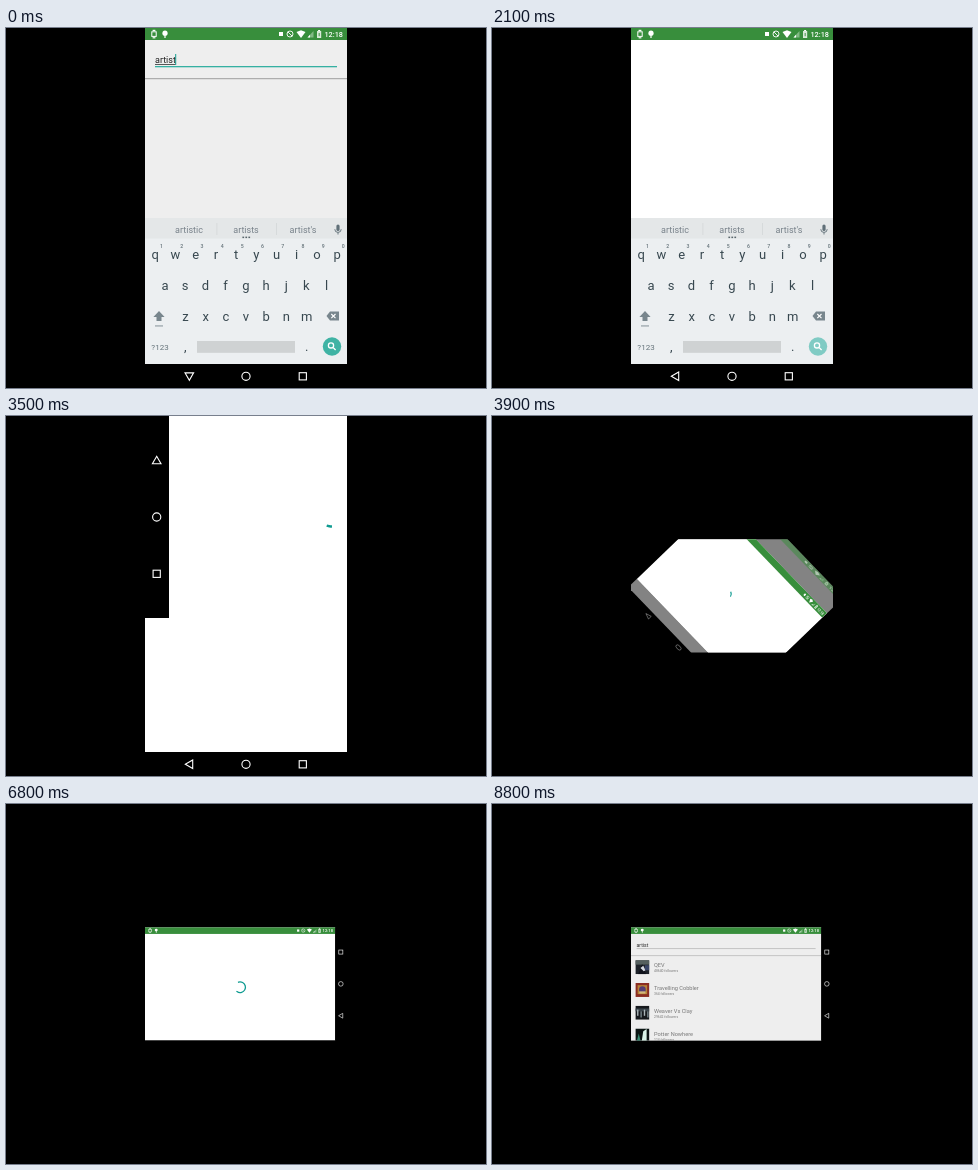
An HTML page with a canvas for the animation above (10 s loop, 480 by 360 pixels).

```html
<!DOCTYPE html>
<html lang="en">
<head>
<meta charset="utf-8">
<title>Search and rotate</title>
<style>
html, body { margin: 0; width: 100%; height: 100%; overflow: hidden; background: #000; }
canvas { display: block; width: 480px; height: 360px; }
</style>
</head>
<body>
<canvas id="stage" width="480" height="360"></canvas>
<script>
const g = document.getElementById('stage').getContext('2d');
const LOOP = 10000, STEP = 100;
const W = 202, H = 360, K = W / H;
const LEFT = 139, TOP = 123.2;
const GREEN = '#388e3c', TEAL = '#0f9b91', PAPER = '#eeeeee', INK = '#37474f';
const ARTISTS = [
  ['QEV', '48640 followers'],
  ['Travelling Cobbler', '364 followers'],
  ['Weaver Vs Clay', '29642 followers'],
  ['Potter Nowhere', '114 followers']
];

const clamp = v => Math.max(0, Math.min(1, v));
const mix = (a, b, p) => a + (b - a) * p;

function rect(x, y, w, h, color) {
  g.fillStyle = color;
  g.fillRect(x, y, w, h);
}

function disc(x, y, r, color) {
  g.fillStyle = color;
  g.beginPath();
  g.arc(x, y, r, 0, Math.PI * 2);
  g.fill();
}

function path(points, close) {
  g.beginPath();
  points.forEach(([x, y]) => g.lineTo(x, y));
  if (close) g.closePath();
}

function shape(points, color) {
  path(points, true);
  g.fillStyle = color;
  g.fill();
}

function outline(points, color, width, close) {
  path(points, close);
  g.strokeStyle = color;
  g.lineWidth = width;
  g.stroke();
}

function label(text, x, y, size, color, align = 'left', weight = 400) {
  g.font = `${weight} ${size}px Roboto, sans-serif`;
  g.textAlign = align;
  g.fillStyle = color;
  g.fillText(text, x, y);
}

function scoped(draw) {
  g.save();
  draw();
  g.restore();
}

function clipBox(x, y, w, h) {
  g.beginPath();
  g.rect(x, y, w, h);
  g.clip();
}

function statusBar(width) {
  rect(0, 0, width, 12, GREEN);
  g.strokeStyle = '#fff';
  g.lineWidth = 1;
  g.strokeRect(6.8, 3.8, 4.4, 4.6);
  rect(7.6, 1.8, 2.8, 1.2, '#fff');
  rect(7.6, 9.2, 2.8, 1.2, '#fff');
  disc(20, 5.2, 2.6, '#fff');
  rect(19.4, 7, 1.2, 3, '#fff');

  const r = width;
  rect(r - 68, 4, 4, 4, '#fff');
  g.lineWidth = 0.9;
  g.beginPath();
  g.arc(r - 57, 6, 3, 0, Math.PI * 2);
  g.moveTo(r - 59.1, 3.9);
  g.lineTo(r - 54.9, 8.1);
  g.stroke();
  shape([[r - 50.5, 4], [r - 46, 2.2], [r - 41.5, 4], [r - 46, 10]], '#fff');
  shape([[r - 39.5, 9.5], [r - 33.5, 9.5], [r - 33.5, 3]], '#82b985');
  shape([[r - 39.5, 9.5], [r - 37, 9.5], [r - 37, 6.8]], '#fff');
  rect(r - 30, 3, 4.2, 7, '#d9ead9');
  rect(r - 28.9, 2, 2, 1, '#fff');
  rect(r - 28.3, 5, 0.9, 3.2, GREEN);
  label('12:18', r - 4, 8.8, 7.3, '#fff', 'right', 500);
}

function backIcon(x, y, down) {
  scoped(() => {
    g.translate(x, y);
    if (down) g.rotate(-Math.PI / 2);
    outline([[-4, 0], [3.4, -4.3], [3.4, 4.3]], '#fff', 1.1, true);
  });
}

function homeIcon(x, y) {
  g.strokeStyle = '#fff';
  g.lineWidth = 1.1;
  g.beginPath();
  g.arc(x, y, 4.1, 0, Math.PI * 2);
  g.stroke();
}

function recentsIcon(x, y) {
  g.strokeStyle = '#fff';
  g.lineWidth = 1.1;
  g.strokeRect(x - 3.6, y - 3.6, 7.2, 7.2);
}

function bottomNav(down) {
  rect(0, 336, W, 24, '#000');
  backIcon(44.3, 348.3, down);
  homeIcon(101, 348.3);
  recentsIcon(157.8, 348.3);
}

function sideNav() {
  rect(339, 0, 21, W, '#000');
  recentsIcon(349, 44.3);
  homeIcon(349, 101);
  backIcon(349, 157.8, false);
}

// Solves a one-axis cubic for its parameter; the eased value is smoothstep.
function trimEase(x, x0, x1, x2, x3) {
  let lo = 0, hi = 1;
  for (let i = 0; i < 24; i++) {
    const s = (lo + hi) / 2, q = 1 - s;
    const at = q * q * q * x0 + 3 * s * q * q * x1 + 3 * s * s * q * x2 + s * s * s * x3;
    if (at < x) lo = s; else hi = s;
  }
  return lo * lo * (3 - 2 * lo);
}

function spinner(x, y, age, turn = 0) {
  if (age < 0) return;
  const phase = (age / 1333) % 1;
  const tail = phase < 0.5 ? 0 : 0.75 * trimEase(phase, 0.5, 0.7, 0.6, 1);
  const head = phase > 0.5 ? 0.75 : 0.75 * trimEase(phase, 0, 0.2, 0.1, 0.5);
  const base = -0.25 + phase * 0.25 + 2 * age / 6665 + turn / 360;
  g.strokeStyle = TEAL;
  g.lineWidth = 2.3;
  g.lineCap = 'square';
  g.beginPath();
  g.arc(x, y, 9.5, (base + tail) * Math.PI * 2, (base + head + 0.004) * Math.PI * 2);
  g.stroke();
  g.lineCap = 'butt';
}

function searchField(width, focused, cursor) {
  rect(0, 12, width, 324, PAPER);
  label('artist', 10, 34.5, 9, '#222');
  if (focused) rect(10, 36, 20.5, 0.8, '#333');
  rect(10, 38, width - 20, focused ? 1.3 : 0.9, focused ? '#35b0a2' : '#999');
  if (cursor) rect(30.2, 26, 1, 11, '#159d90');
  rect(0, 50, width, 1.1, '#adadad');
  rect(0, 51.1, width, 0.8, '#dcdcdc');
}

function keyRow(letters, x, y) {
  [...letters].forEach((c, i) => label(c, x + i * 20.2, y, 13, INK, 'center'));
}

function keyboard(pressed) {
  rect(0, 190, W, 146, '#eceff1');
  rect(0, 190, W, 20.5, '#e4e7e8');
  ['artistic', 'artists', "artist's"].forEach((word, i) =>
    label(word, 44 + i * 57, 205, 9, '#78828a', 'center'));
  rect(71.5, 195, 0.8, 12, '#d3d7d8');
  rect(131, 195, 0.8, 12, '#d3d7d8');
  for (let i = -1; i < 2; i++) rect(100.4 + i * 3, 208.6, 1.7, 1.5, '#58656b');

  g.lineCap = 'round';
  outline([[193, 198], [193, 201.5]], '#607078', 3.2);
  g.lineCap = 'butt';
  g.lineWidth = 0.9;
  g.beginPath();
  g.arc(193, 201.2, 3.2, 0, Math.PI);
  g.moveTo(193, 204.4);
  g.lineTo(193, 206.5);
  g.stroke();

  keyRow('qwertyuiop', 10.3, 231);
  [...'1234567890'].forEach((n, i) => label(n, 16.5 + i * 20.2, 219.5, 5.2, '#66747b', 'center', 500));
  keyRow('asdfghjkl', 20, 262);
  keyRow('zxcvbnm', 40.4, 292.5);

  shape([[14, 283], [19.6, 289], [16.5, 289], [16.5, 293], [11.5, 293], [11.5, 289], [8.4, 289]], '#78868d');
  rect(10, 297.5, 8, 0.9, '#78868d');
  shape([[181.5, 288], [185, 283.5], [194, 283.5], [194, 292.5], [185, 292.5]], '#78868d');
  outline([[186.3, 286], [190.5, 290.2]], '#fff', 1.1);
  outline([[190.5, 286], [186.3, 290.2]], '#fff', 1.1);

  label('?123', 15, 321.5, 8, '#66747b', 'center');
  label(',', 40.4, 322.5, 13, INK, 'center');
  rect(52, 313, 98, 11.8, '#cfd2d3');
  label('.', 161.6, 322.5, 13, INK, 'center');

  disc(187, 318.5, 9.2, pressed ? '#80cbc4' : '#3fb3a4');
  g.strokeStyle = '#fff';
  g.lineWidth = 1.3;
  g.beginPath();
  g.arc(186, 317.4, 2.6, 0, Math.PI * 2);
  g.moveTo(187.9, 319.3);
  g.lineTo(190.6, 322);
  g.stroke();
}

function portrait(t) {
  const loading = t >= 2100;
  rect(0, 0, W, 336, '#fff');
  if (loading) spinner(101, 174, t - 2270);
  else searchField(W, true, t < 100 || (t >= 600 && t < 1100) || t >= 1600);
  const hide = clamp((t - 2100) / 180);
  if (hide < 1) scoped(() => {
    clipBox(0, 0, W, 336);
    g.globalAlpha *= 1 - hide;
    g.translate(0, hide * 15);
    keyboard(t >= 2000);
  });
  statusBar(W);
  bottomNav(!loading);
}

function thumbnail(i, y) {
  const x = 7.8, size = 25;
  scoped(() => {
    clipBox(x, y, size, size);
    g.translate(x, y);
    if (i === 0) {
      rect(0, 0, size, size, '#1d2229');
      rect(0, 0, size, 8, '#55605f');
      shape([[5, 25], [12, 7], [19, 25]], '#10131c');
      shape([[9, 14], [14, 10], [18, 18], [15, 20]], '#d5d9e2');
      rect(17, 9, 8, 9, '#3a4668');
    } else if (i === 1) {
      rect(0, 0, size, size, '#8b2d22');
      rect(4, 4, 17, 16, '#b78336');
      disc(12.5, 12, 6, '#553c72');
      rect(7, 15, 11, 4, '#d4b77b');
    } else if (i === 2) {
      rect(0, 0, size, size, '#16191d');
      rect(0, 5, size, 5, '#39434a');
      for (let k = 0; k < 4; k++) rect(3 + k * 6, 7 + (k % 2) * 3, 2.5, 11, k % 2 ? '#78868c' : '#aab4b7');
    } else {
      rect(0, 0, size, size, '#0b1513');
      shape([[11, 25], [14, 5], [20, 1], [20, 25]], '#d9f4e8');
      shape([[2, 25], [6, 9], [10, 25]], '#398b72');
    }
  });
}

function results(t) {
  searchField(339, false, false);
  ARTISTS.forEach(([name, followers], i) => {
    const y = 58.7 + i * 40.6;
    label(name, 41, y + 12.8, 10, '#777');
    label(followers, 41, y + 21.6, 6, '#777');
    scoped(() => {
      g.globalAlpha *= clamp((t - 8000 - i * 60) / 600);
      thumbnail(i, y);
    });
  });
}

function landscape(t, turning) {
  const width = turning ? H : 339;
  rect(0, 0, width, W, '#fff');
  spinner(169.5, 107, t - 3750, -12);
  const shown = clamp((t - 7100) / 500);
  if (shown > 0) scoped(() => {
    g.globalAlpha = shown;
    results(t);
  });
  statusBar(width);
  if (!turning) sideNav();
}

function turnScreens(t) {
  const p = clamp((t - 3800) / 205);
  const angle = (1 - p) * Math.PI / 2;
  clipBox(LEFT, TOP, W, W * K);
  scoped(() => {
    g.globalAlpha = 1 - p;
    g.translate(240, 180);
    g.rotate(angle);
    g.scale(mix(K, 1, p), mix(K, K * K, p));
    g.translate(-W / 2, -H / 2);
    portrait(3400);
  });
  if (p > 0) scoped(() => {
    g.translate(240, 180);
    g.rotate(angle);
    g.scale(mix(K, 1, p) * K, K);
    g.translate(-H / 2, -W / 2);
    clipBox(0, 0, H, W);
    landscape(t, true);
  });
}

function render(t) {
  rect(0, 0, 480, 360, '#000');
  scoped(() => {
    if (t < 3600) {
      g.translate(LEFT, 0);
      clipBox(0, 0, W, H);
      portrait(Math.min(t, 3400));
      if (t >= 3500) {
        g.transform(0, 1, -1, 0, H, 0);
        portrait(3400);
      }
    } else if (t < 4100) {
      turnScreens(t);
    } else {
      clipBox(LEFT, TOP, W, W * K);
      g.translate(LEFT, TOP);
      g.scale(K, K);
      landscape(t, false);
    }
  });
}

const start = performance.now();
function tick() {
  const t = (performance.now() - start) % LOOP;
  render(Math.floor(t / STEP) * STEP);
  requestAnimationFrame(tick);
}
tick();
</script>
</body>
</html>
```
